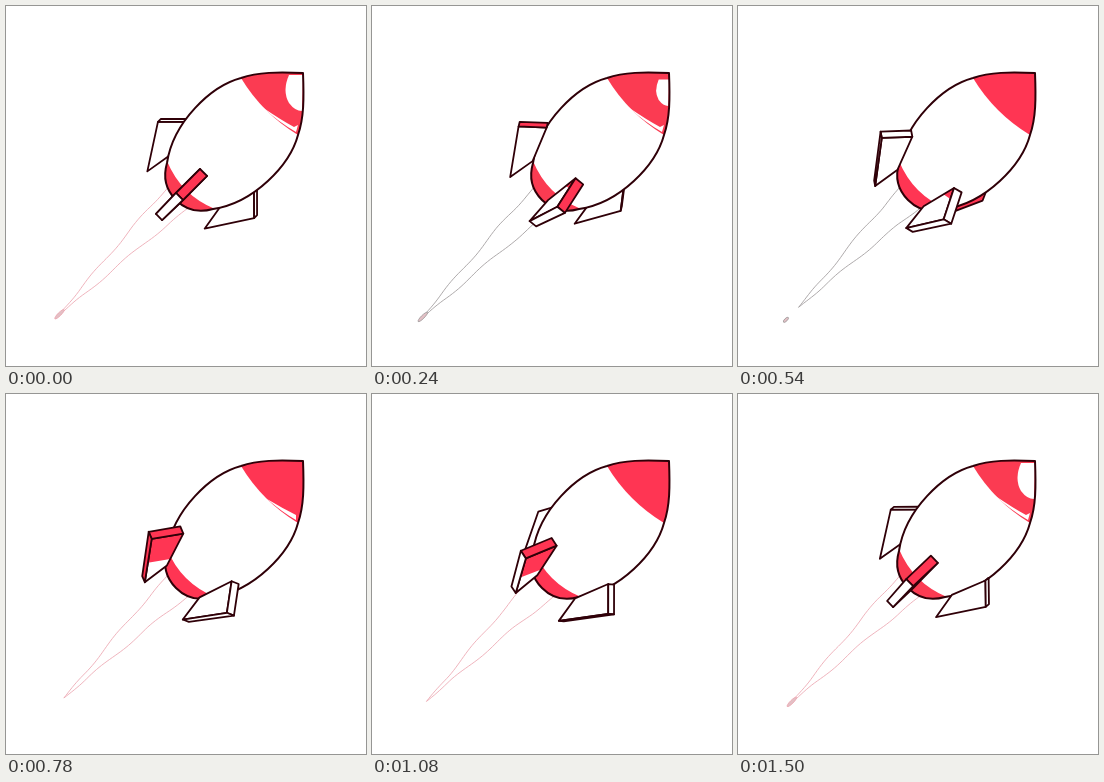
Recreate the animation shown at these times as an HTML page with a canvas. Size 360x360 px, loop 1.53 s.

```html
<!DOCTYPE html>
<html lang="en">
<head>
<meta charset="utf-8">
<title>Spinning rocket</title>
<style>
  html, body { margin: 0; width: 100%; height: 100%; overflow: hidden; background: #fff; }
  canvas { display: block; width: 360px; height: 360px; }
</style>
</head>
<body>
<canvas id="stage" width="360" height="360"></canvas>
<script>
const ctx = document.getElementById('stage').getContext('2d');
const LOOP = 1530, STEP = 30, TAU = Math.PI * 2;
const RED = '#ff3553', INK = '#2f0008', WHITE = '#fff';

const body = new Path2D('M297 67C272 66 252 66 235 72C205 80 167 116 161 157' +
  'C156 174 161 185 170 194C179 203 190 208 207 203C248 197 284 159 292 129C298 112 298 92 297 67Z');
const nose = new Path2D('M297 67C272 66 252 66 235 72Q256.500 107.500 292 129C298 112 298 92 297 67Z');
const band = new Path2D('M161 155Q175 189 209 203C190 208 179 203 170 194C161 185 156 174 161 155Z');
const streak = new Path2D('M256 101Q275 114 288 121L292 119L290 126Q274 117 256 101Z');
const thinStreak = new Path2D('M261 105Q276 114 290 121L290 126Q276 118 261 105Z');
const shine = new Path2D('M297 69L283 69Q276 85 283 97Q289 105 296 105Z');

// Fin corners: p runs along the rocket, q across it.
const corners = {
  A: { p: [46, -27, 3], r: 49.5, k: 0.1 },
  O: { p: [27.6, -25.6, -14], r: 68, k: 0.24 },
  T: { p: [-15.2, -25.8, 0], r: 40.5, k: 0.05 },
  B: { p: [12, -25, 0], r: 36, k: 0.05 }
};

function corner(name, angle, side) {
  const { p, r, k } = corners[name];
  const c = Math.cos(angle), s = Math.sin(angle);
  const half = (name === 'T' ? 4.3 : 5) * side;
  return [p[0] + p[1] * c + p[2] * c * c + half * 0.42 * s,
          r * s * (1 + k * c) + half * c];
}

const mix = (a, b, f) => [a[0] + (b[0] - a[0]) * f, a[1] + (b[1] - a[1]) * f];

function area(pts) {
  return pts.reduce((sum, [x, y], i) => {
    const [nx, ny] = pts[(i + 1) % pts.length];
    return sum + x * ny - nx * y;
  }, 0);
}

function poly(pts, fill, stroke) {
  ctx.beginPath();
  pts.forEach(([x, y]) => ctx.lineTo(x, y));
  ctx.closePath();
  if (fill) { ctx.fillStyle = fill; ctx.fill(); }
  if (stroke) { ctx.strokeStyle = stroke; ctx.stroke(); }
}

const axisSpace = () => {
  const c = Math.SQRT1_2;
  ctx.setTransform(c, -c, c, c, 182, 182);
};
const screenSpace = () => ctx.setTransform(1, 0, 0, 1, 0, 0);

function fin(angle) {
  const deg = angle * 360 / TAU;
  const at = (name, side) => corner(name, angle, side);
  ctx.lineWidth = 1.8;
  for (const side of [1, -1]) {
    const face = ['A', 'O', 'T', 'B'].map(n => at(n, side));
    if (area(face) * side >= 0) continue;
    const [A, O, T, B] = face;
    poly(face, deg > 112 ? RED : WHITE);
    if (deg > -50 && deg < -5) poly([A, O, mix(O, T, 0.55), mix(A, B, 0.8)], RED);
    if (deg > 5 && deg < 42) poly([A, mix(A, O, 0.35), mix(A, B, 0.35)], RED);
    poly(face, null, INK);
  }
  const strip = (a, b, fill) => {
    const face = [at(a, -1), at(b, -1), at(b, 1), at(a, 1)];
    if (area(face) < 0) poly(face, fill, INK);
  };
  strip('A', 'O', (deg > -50 && deg < 22) || (deg > -85 && deg < -70) ? RED : WHITE);
  strip('O', 'T', deg > -50 && deg < -35 ? RED : WHITE);
}

function blob(p, length, width) {
  ctx.beginPath();
  ctx.ellipse(p, -1.6, length, width, 0, 0, TAU);
  ctx.fillStyle = '#e3c0c5';
  ctx.fill();
  ctx.stroke();
}

function flame(u) {
  const v = (u + 0.78) % 1;
  const top = -8, tip = -(167 + 24.5 * v);
  ctx.strokeStyle = u > 0.08 && u < 0.42 ? '#a09b9c' : '#eda7b1';
  ctx.lineWidth = 0.8;
  for (const side of [-1, 1]) {
    ctx.beginPath();
    for (let i = 0; i <= 50; i++) {
      const s = i / 50;
      const p = top + (tip - top) * s;
      const wave = Math.cos(TAU * ((-p - 55) / 73 - u)) * Math.min(1, s * 5, (1 - s) * 5);
      ctx.lineTo(p, side * (15 * (1 - s) + wave) - 1.5 * Math.min(1, s * 3));
    }
    ctx.stroke();
  }
  if (v > 0.7) blob(tip + 6, 6.5, 1.6);
  if (v < 0.25) blob(-188, 6 - 20 * v, 1.4);
}

function hull(u) {
  const t = u * LOOP;
  const bright = t < 330 || t > 1400;
  ctx.fillStyle = WHITE;
  ctx.fill(body);
  ctx.fillStyle = bright ? '#fb3b52' : RED;
  ctx.fill(nose);
  ctx.fill(band);
  ctx.fillStyle = WHITE;
  if (bright) {
    ctx.fill(streak);
    const size = t < 330 ? 1 - t / 900 : 1;
    ctx.save();
    ctx.translate(297, 86);
    ctx.scale(size, size);
    ctx.translate(-297, -86);
    ctx.fill(shine);
    ctx.restore();
  } else if ((t > 660 && t < 900) || t > 1220) {
    ctx.fill(thinStreak);
  }
  ctx.strokeStyle = INK;
  ctx.lineWidth = 2;
  ctx.stroke(body);
}

function draw(u) {
  screenSpace();
  ctx.fillStyle = WHITE;
  ctx.fillRect(0, 0, 360, 360);
  ctx.lineJoin = 'round';

  // A quarter turn brings each of the four fins to its neighbour's place.
  const fins = [-2, -1, 0, 1]
    .map(i => (i + u) * TAU / 4)
    .sort((a, b) => Math.cos(a) - Math.cos(b));
  const inFront = a => Math.cos(a) > 0.001;

  axisSpace();
  flame(u);
  fins.filter(a => !inFront(a)).forEach(fin);
  screenSpace();
  hull(u);
  axisSpace();
  fins.filter(inFront).forEach(fin);
}

const start = performance.now();
function tick() {
  const t = (performance.now() - start) % LOOP;
  draw(Math.floor(t / STEP) * STEP / LOOP);
  requestAnimationFrame(tick);
}
tick();
</script>
</body>
</html>
```
